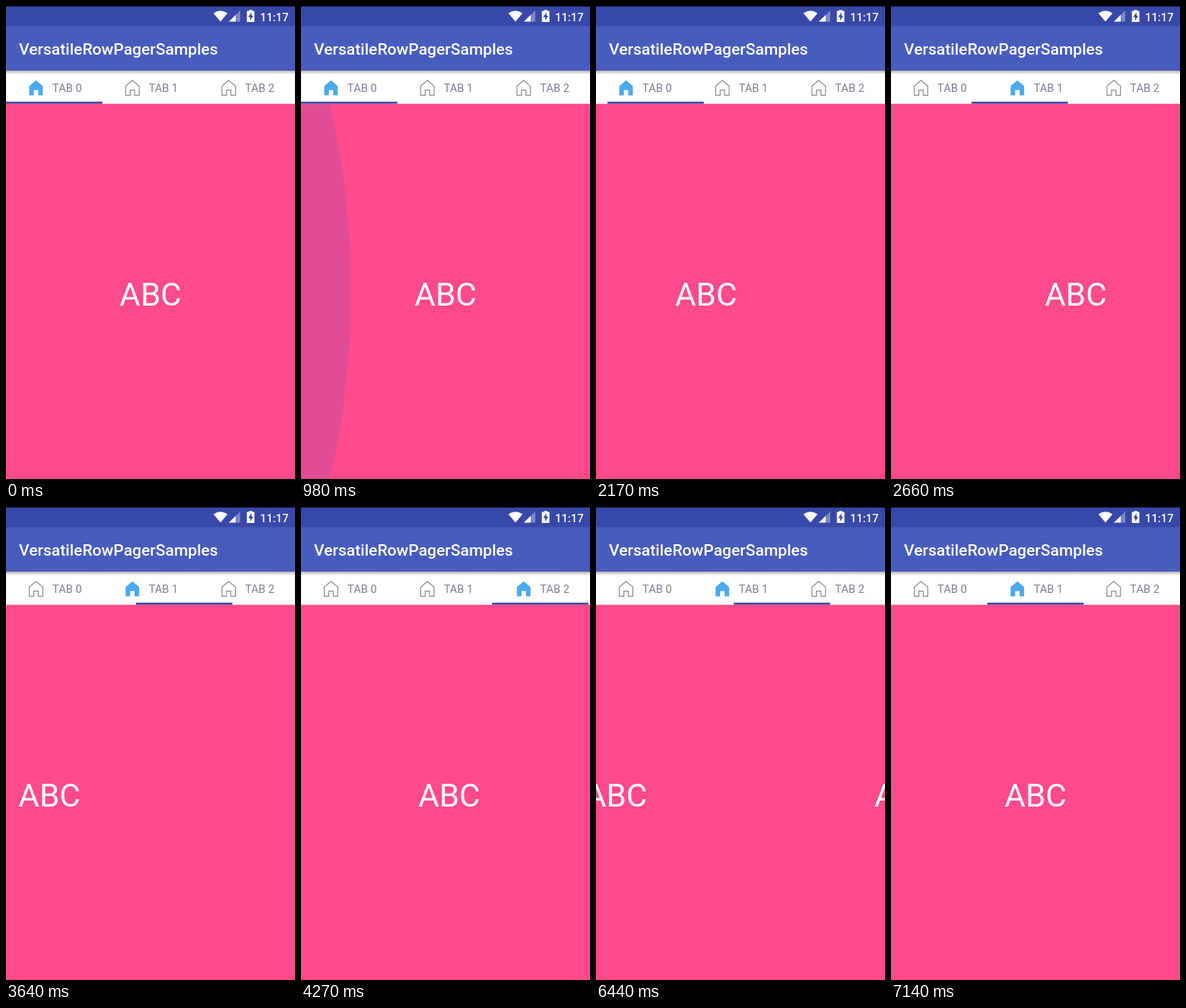
These frames come from a looping animation (380 by 622 pixels, 7280 ms). An HTML page:

```html
<!DOCTYPE html>
<html lang="en">
<head>
<meta charset="utf-8">
<title>Tab pager</title>
<style>
html, body { margin: 0; width: 100%; height: 100%; overflow: hidden; background: #ff4a8b; }
svg { display: block; width: 380px; height: 622px; font-family: Roboto, sans-serif; }
.title, .clock { font-weight: 500; fill: #fff; }
.title { font-size: 21.1px; }
.clock { font-size: 14.8px; }
.label { font-size: 14.6px; fill: #7e7e99; }
.word { font-size: 42.2px; fill: #fff; text-anchor: middle; }
.home { fill: #fff; stroke: #8c8c8c; stroke-width: 1.2; }
.home.on { fill: #4ba9ee; stroke: none; }
</style>
</head>
<body>
<svg viewBox="0 0 380 622">
  <defs>
    <linearGradient id="shade" x1="0" y1="0" x2="0" y2="1">
      <stop offset="0" stop-color="#000" stop-opacity=".3"/>
      <stop offset="1" stop-color="#000" stop-opacity="0"/>
    </linearGradient>
    <clipPath id="body"><rect y="128" width="380" height="494"/></clipPath>
  </defs>

  <rect y="128" width="380" height="494" fill="#ff4a8b"/>
  <g id="pages"></g>
  <g clip-path="url(#body)"><ellipse id="glow" cy="375.5" ry="739.5" fill="#4a5cc8"/></g>

  <rect y="85" width="380" height="43.6" fill="#fff"/>
  <rect y="85" width="380" height="5" fill="url(#shade)"/>
  <g id="tabs"></g>
  <rect id="bar" y="125.8" width="126.67" height="2.8" fill="#43469c"/>

  <rect y="26" width="380" height="59" fill="#485cbd"/>
  <rect width="380" height="26.5" fill="#3748a8"/>
  <rect width="380" height="1" fill="#12173c"/>
  <text class="title" x="17" y="64.2">VersatileRowPagerSamples</text>

  <path d="M272.7 9.6Q282 2.8 291.3 9.6L282 20.6Z" fill="#fff"/>
  <path d="M308 6V20.5H293Z" fill="#fff" opacity=".35"/>
  <path d="M302 11.8V20.5H293Z" fill="#fff"/>
  <path d="M319.5 6.5V5.2H323.8V6.5H326.6V21H316.7V6.5Z" fill="#fff"/>
  <path d="M322.8 8.6L318.4 14.6H321V18.9L325.2 12.8H322.8Z" fill="#3748a8"/>
  <text class="clock" x="334" y="19.6">11:17</text>
</svg>
<script>
const LOOP = 7280, STEP = 70, WIDTH = 380, TAB = WIDTH / 3;
const SETTLE = 600, LAG = 16;
const $ = id => document.getElementById(id);

// Each swipe: drag points [time, page], then a settle to the end page.
const swipes = [
  { drag: [[2060, 0], [2300, 0.26], [2534, 0.547]], end: 1 },
  { drag: [[3400, 1], [3640, 1.35], [3990, 1.7]], end: 2 },
  { drag: [[5980, 2], [6020, 1.946], [6240, 1.67], [6440, 1.43]], end: 1 }
];

// [time, stretch, opacity] of the edge glow
const glowKeys = [
  [800, 0, 0], [910, 0.6, 0.12], [1190, 0.85, 0.33], [1470, 0.9, 0.4],
  [1610, 0.545, 0.235], [1680, 0.27, 0.12], [1750, 0, 0]
];

function sample(keys, t, col) {
  if (t <= keys[0][0]) return keys[0][col];
  for (let i = 1; i < keys.length; i++) {
    const a = keys[i - 1], b = keys[i];
    if (t <= b[0]) return a[col] + (b[col] - a[col]) * (t - a[0]) / (b[0] - a[0]);
  }
  return keys[keys.length - 1][col];
}

function settle(from, to, age) {
  const left = 1 - Math.min(1, Math.max(0, age) / SETTLE);
  return to + (from - to) * left ** 5;
}

// The bar trails the page slightly while settling.
function poseAt(t) {
  let pose = { page: 0, bar: 0, tab: 0 };
  for (const { drag, end } of swipes) {
    if (t < drag[0][0]) break;
    const [release, from] = drag[drag.length - 1];
    if (t < release) {
      const page = sample(drag, t, 1);
      pose = { page, bar: page, tab: pose.tab };
    } else {
      const age = t - release;
      pose = { page: settle(from, end, age), bar: settle(from, end, age - LAG), tab: end };
    }
  }
  return pose;
}

const home = "M9.5 .7L.6 8.2V20.4H6.6V13.6H12.4V20.4H18.4V8.2Z";
for (let i = 0; i < 3; i++) {
  const x = i * TAB;
  $("tabs").innerHTML +=
    `<path class="home" d="${home}" transform="translate(${30 + x} 97)"/>` +
    `<text class="label" x="${61 + x}" y="113">TAB ${i}</text>`;
  $("pages").innerHTML += `<text class="word" x="${(i + 0.5) * WIDTH}" y="394.3">ABC</text>`;
}
const homes = document.querySelectorAll(".home");

function draw(t) {
  const { page, bar, tab } = poseAt(t);
  $("pages").setAttribute("transform", `translate(${-page * WIDTH} 0)`);
  $("bar").setAttribute("x", bar * TAB);
  homes.forEach((el, i) => el.classList.toggle("on", i === tab));

  const stretch = sample(glowKeys, t, 1);
  const glow = $("glow");
  glow.setAttribute("cx", -640.4 * stretch);
  glow.setAttribute("rx", 739.5 * stretch);
  glow.setAttribute("opacity", sample(glowKeys, t, 2));
}

const start = performance.now();
function tick() {
  const t = (performance.now() - start) % LOOP;
  draw(Math.floor(t / STEP) * STEP);
  requestAnimationFrame(tick);
}
tick();
</script>
</body>
</html>
```
